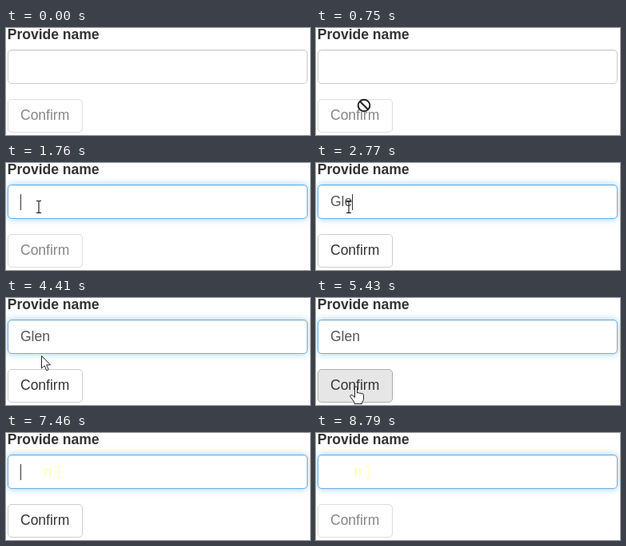
Animation, 380 px wide and 134 px high, one loop 8.88 s. Source, as an HTML page:

```html
<!DOCTYPE html>
<html lang="en">
<head>
<meta charset="utf-8">
<title>Name form</title>
<style>
  html, body { margin: 0; width: 100%; height: 100%; overflow: hidden; background: #fff; }
  #stage { position: absolute; left: 0; top: 0; width: 380px; height: 134px; overflow: hidden; }
  .box { position: absolute; box-sizing: border-box; border: 1px solid #ccc; border-radius: 5px; background: #fff; }
  #field { left: 2px; top: 27px; width: 375px; height: 43px; }
  #button { left: 2px; top: 89px; width: 94px; height: 42px; }
  svg { position: absolute; left: 0; top: 0; }
  text { font: 17.5px "Liberation Sans", Arial, sans-serif; }
  .label { font-weight: bold; fill: #333; }
  #spot { mix-blend-mode: multiply; }
</style>
</head>
<body>
<div id="stage">
  <div id="field" class="box"></div>
  <div id="button" class="box"></div>
  <svg width="380" height="134" viewBox="0 0 380 134">
    <text class="label" x="1.75" y="14">Provide name</text>
    <text id="caption" x="18" y="115">Confirm</text>
    <g id="trace">
      <text x="47.5" y="54" fill="#ffffb4">n</text>
      <path d="M62 41.5h4.5v15H62" fill="none" stroke="#ffffb4"/>
    </g>
    <rect id="selection" x="18" y="38" width="38" height="21" fill="#3297fd"/>
    <text id="value" x="18" y="54"></text>
    <rect id="caret" y="39" width="1" height="20" fill="#333"/>
    <circle id="spot" r="12" fill="#ffff50"/>
    <g id="pointer">
      <path id="arrow" d="M.5 .5v15.6l3.6-3.4 2.6 6 2.5-1.1-2.6-5.8h4.9z" fill="#fff" stroke="#222"/>
      <path id="beam" d="M-3-7.5h2.2l.8.7.8-.7H3M0-7V7M-3 7.5h2.2L0 6.8l.8.7H3" fill="none" stroke="#111" stroke-width="1.1"/>
      <g id="denied" fill="none" stroke="#222" stroke-width="2">
        <circle r="7.3"/><path d="M-5-5 5 5"/>
      </g>
      <path id="hand" d="M-1.5 12V1.5a1.5 1.5 0 0 1 3 0V8q1.4-1.2 2.8.4 1.5-1 2.7.5 2.5-.6 2.5 1.8v4.5q0 2.6-2 4.5v1.8H-2v-1.7l-5-7.2q-.8-1.8.8-2.2 1.5 0 4.7 3z" fill="#fff" stroke="#222"/>
    </g>
  </svg>
</div>
<script>
const LOOP = 8880;
const $ = id => document.getElementById(id);
const cursors = ['arrow', 'beam', 'denied', 'hand'];

// Cursor kind and position, each held until the next entry
const moves = [[0, '', 0, 0]];
const travel = (start, step, list) =>
  list.forEach(([kind, x, y], i) => moves.push([start + i * step, kind, x, y]));

travel(140, 77, [
  ['arrow', 285, 115], ['arrow', 232, 111], ['arrow', 180, 107], ['arrow', 137, 103],
  ['arrow', 104, 99], ['denied', 84, 97], ['denied', 70, 95], ['denied', 60, 97],
  ['denied', 54, 102], ['denied', 51, 106], ['denied', 50, 107]
]);
travel(1230, 70, [['arrow', 45, 80], ['beam', 45, 66]]);
travel(1450, 80, [['beam', 41, 56], ['beam', 41, 55]]);
travel(4260, 75, [
  ['beam', 42, 61], ['arrow', 43, 67], ['arrow', 44, 72],
  ['arrow', 46, 82], ['hand', 49, 101], ['hand', 50, 111]
]);
travel(5580, 77, [['hand', 54, 96], ['arrow', 58, 78], ['beam', 62, 58], ['beam', 64, 48]]);
travel(6050, 80, [['beam', 26, 34], ['', 0, 0]]);
travel(6430, 100, [['beam', 39.5, 59], ['', 0, 0]]);

const typing = [[0, ''], [2140, 'G'], [2370, 'Gl'], [2770, 'Gle'], [2850, 'Glen'], [7460, '']];
const blink = [
  [0, 0], [1530, 1], [3330, 0], [3880, 1], [4335, 0], [4950, 1],
  [5430, 0], [5980, 1], [6050, 0], [7460, 1], [7920, 0], [8470, 1], [8790, 0]
];

const at = (track, t) => track.reduce((held, key) => key[0] <= t ? key : held);
const within = (t, a, b) => t >= a && t < b;
const show = (id, on) => $(id).style.display = on ? '' : 'none';
const mix = (a, b, k) => `rgb(${a.map((v, i) => Math.round(v + (b[i] - v) * k))})`;

function drawField(t) {
  const focus = Math.min(1, Math.max(0, (t - 1610) / 150));
  const selected = within(t, 6050, 7460);
  $('field').style.borderColor = mix([204, 204, 204], [102, 175, 233], focus);
  $('field').style.boxShadow =
    `inset 0 1px 1px rgba(0,0,0,.075), 0 0 ${10 * focus}px rgba(102,175,233,${.6 * focus})`;
  $('value').textContent = at(typing, t)[1];
  $('value').setAttribute('fill', selected ? '#fff' : '#555');
  show('selection', selected);
  show('trace', t >= 6130);
  show('caret', at(blink, t)[1]);
  const width = $('value').textContent ? $('value').getComputedTextLength() : 0;
  $('caret').setAttribute('x', Math.round(18 + width));
}

function drawButton(t) {
  const enabled = within(t, 2770, 7690);
  const hover = within(t, 4560, 5657);
  const style = $('button').style;
  style.background = hover ? '#e6e6e6' : '#fff';
  style.borderColor = hover ? '#adadad' : enabled ? '#ccc' : '#ddd';
  $('caption').setAttribute('fill', enabled ? '#333' : '#858585');
}

function drawPointer(t) {
  const [, kind, x, y] = at(moves, t);
  cursors.forEach(id => show(id, id === kind));
  $('pointer').setAttribute('transform', `translate(${x} ${y})`);
  const pressed = within(t, 1530, 1690) || within(t, 6050, 6130);
  show('spot', pressed);
  $('spot').setAttribute('cx', t < 2000 ? x - 1.5 : x);
  $('spot').setAttribute('cy', t < 2000 ? y - 1 : y);
}

function render(t) {
  drawField(t);
  drawButton(t);
  drawPointer(t);
}

const start = performance.now();
function tick() {
  render((performance.now() - start) % LOOP);
  requestAnimationFrame(tick);
}
tick();
</script>
</body>
</html>
```
